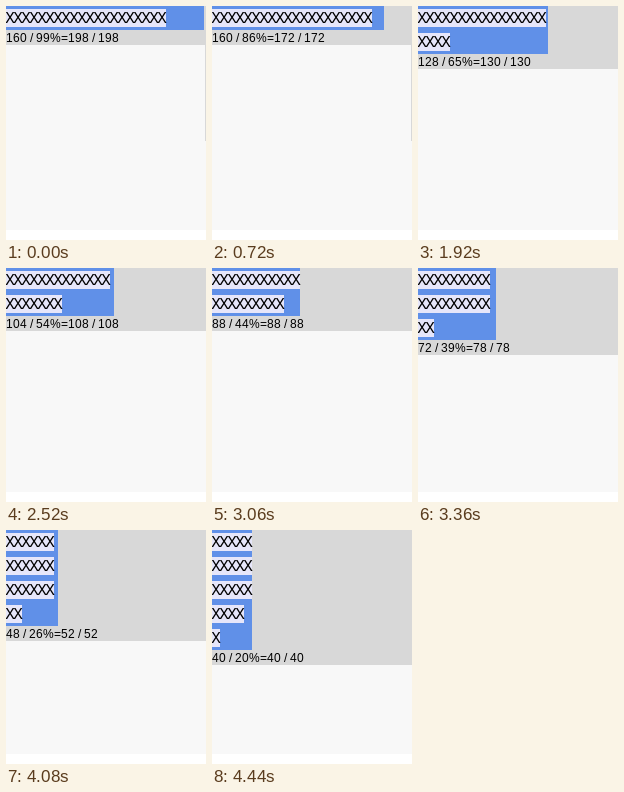
An HTML page with a canvas for the animation above (4.5 s loop, 200 px wide and 234 px high).

```html
<!DOCTYPE html>
<html lang="en">
<head>
<meta charset="utf-8">
<title>Shrinking box</title>
<style>
  html, body { margin: 0; width: 200px; height: 234px; overflow: hidden; background: #fff; }
  canvas { display: block; }
</style>
</head>
<body>
<canvas id="stage" width="200" height="234"></canvas>
<script>
const ctx = document.getElementById('stage').getContext('2d');
const STEP = 60, STEPS = 75;
const CELL = 8, LINE = 24, COUNT = 20;
const SKIPS = [10, 22, 36, 50, 64]; // steps that drop two percent
const MONO = '16px "Liberation Mono", monospace';
const SANS = '12px "Liberation Sans", Arial, sans-serif';

const percentAt = step => 99 - step - SKIPS.filter(s => s <= step).length;

// Break the letters into rows; a completely full last row pushes its last letter down.
function wrap(width) {
  const per = Math.floor(width / CELL);
  const rows = [];
  for (let left = COUNT; left > 0; left -= per) rows.push(Math.min(per, left));
  if (rows[rows.length - 1] === per) {
    rows[rows.length - 1]--;
    rows.push(1);
  }
  return rows;
}

function rect(color, x, y, w, h) {
  ctx.fillStyle = color;
  ctx.fillRect(x, y, w, h);
}

function drawRow(length, y) {
  rect('#e6e6fa', 0, y + 3, length * CELL, 18);
  ctx.fillStyle = '#000';
  ctx.font = MONO;
  ctx.textAlign = 'center';
  for (let i = 0; i < length; i++) ctx.fillText('X', (i + 0.5) * CELL, y + 17);
}

// Each glyph starts on a whole pixel, as in hinted screen text.
function drawLabel(text, y) {
  ctx.fillStyle = '#000';
  ctx.font = SANS;
  ctx.textAlign = 'left';
  let x = 0;
  for (const char of text) {
    ctx.fillText(char, x, y);
    x += Math.round(ctx.measureText(char).width);
  }
}

function draw(step) {
  const percent = percentAt(step);
  const width = percent * 2;
  const rows = wrap(width);
  const height = rows.length * LINE;

  rect('#fff', 0, 0, 200, 234);
  rect('#f8f8f8', 0, 0, 200, 224);
  rect('#d8d8d8', 0, 0, 200, height + 15);
  if (rows.length === 1) rect('#d8d8d8', 199, 0, 1, 135);
  rect('#6090e8', 0, 0, width, height);
  rows.forEach((length, i) => drawRow(length, i * LINE));

  const used = Math.max(...rows) * CELL;
  drawLabel(`${used} / ${percent}%=${width} / ${width}`, height + 12);
}

let start;
function tick(now) {
  start ??= now;
  draw(Math.floor((now - start) / STEP) % STEPS);
  requestAnimationFrame(tick);
}
draw(0);
requestAnimationFrame(tick);
</script>
</body>
</html>
```
